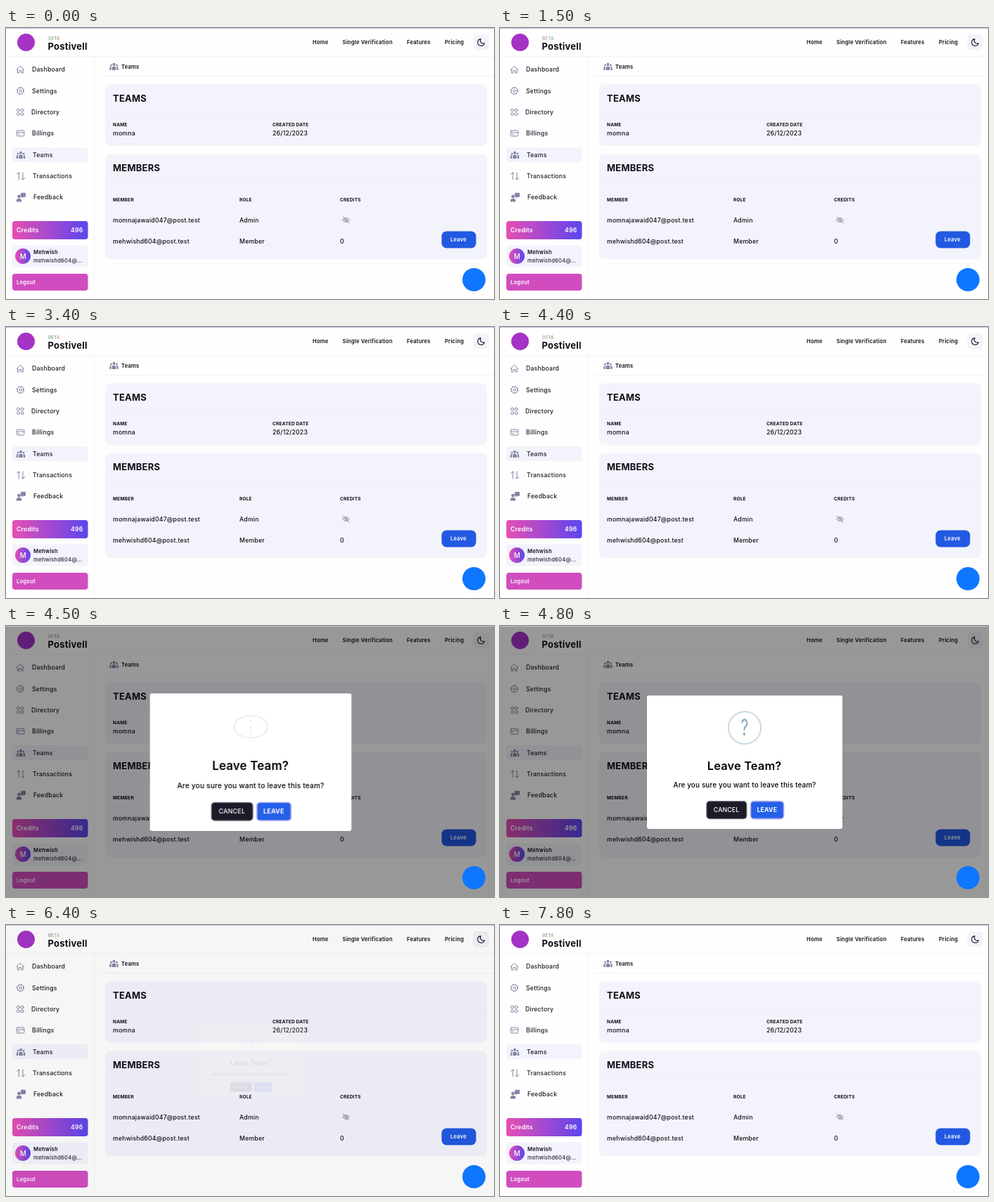
These frames come from a looping animation (694 by 386 pixels, 8000 ms). An HTML page:

```html
<!DOCTYPE html>
<html lang="en">
<head>
<meta charset="utf-8">
<title>Team settings</title>
<style>
html, body { margin: 0; width: 100%; height: 100%; overflow: hidden; background: #fefefe; }
body { position: relative; font-family: Inter, sans-serif; letter-spacing: .217px; }
svg { display: block; overflow: visible; }
#page, #dialog, #backdrop { position: absolute; left: 0; top: 0; width: 694px; height: 386px; }
#backdrop { top: 1px; height: 385px; background: rgba(0, 0, 0, .4); }
#dialog { opacity: 0; }
#popup { position: absolute; left: 208.5px; top: 99px; width: 278px; height: 190px; border-radius: 2.7px; background: #fff; }
#icon { position: absolute; left: 115px; top: 22px; width: 43.6px; height: 43.6px; border: 2.2px solid #c9dae1; border-radius: 50%; }
#mark { color: #80a5b7; font-size: 32.6px; line-height: 43.6px; text-align: center; letter-spacing: 0; }
#chat { position: absolute; left: 649.3px; top: 341.5px; width: 33px; height: 33px; border-radius: 50%; background: #0f76ff; }
.line { fill: none; stroke: #8585a6; stroke-width: 1; stroke-linecap: round; stroke-linejoin: round; }
.solid { fill: #8585a6; }
.panel { fill: #f3f3fb; }
.rule { stroke: #f3f3f6; stroke-width: 1; }
.panel-rule { stroke: #ececf4; stroke-width: 1; }
</style>
</head>
<body>
<svg id="page" viewBox="0 0 694 386">
  <defs>
    <linearGradient id="brand"><stop stop-color="#e64fb3"/><stop offset="1" stop-color="#5d45ee"/></linearGradient>
    <linearGradient id="shimmer" gradientUnits="userSpaceOnUse" x1="60" x2="84" spreadMethod="repeat">
      <stop stop-color="#b4c2b4"/><stop offset=".35" stop-color="#68a870"/>
      <stop offset=".7" stop-color="#d0949a"/><stop offset="1" stop-color="#b4c2b4"/>
    </linearGradient>
    <g id="people" class="solid">
      <circle cx="0" cy="-3.2" r="2"/><circle cx="-4" cy="-1.9" r="1.4"/><circle cx="4" cy="-1.9" r="1.4"/>
      <path d="M-2.8 5V2.2a2.8 2.8 0 0 1 5.6 0V5zM-6.2 5V2.2a2.1 2.1 0 0 1 2.6-2Q-4 1-4 5zM6.2 5V2.2a2.1 2.1 0 0 0-2.6-2Q4 1 4 5z"/>
    </g>
  </defs>
  <rect width="694" height="386" fill="#fefefe"/>
  <rect width="694" height="1" fill="#b4c0d8"/>
  <path class="rule" d="M0 40.5H694M125.5 41V386M134 68.5H694"/>
  <g class="panel">
    <rect x="141" y="80" width="543" height="88" rx="8"/>
    <rect x="141" y="179.5" width="543" height="150" rx="8"/>
    <rect x="9" y="170" width="107.5" height="21" rx="4"/>
    <rect x="9" y="309.5" width="107.5" height="31" rx="4"/>
    <rect x="664.5" y="9" width="22.5" height="22.5" rx="5"/>
  </g>
  <path class="panel-rule" d="M141 121.5H684M141 220.5H684"/>
  <circle cx="28.5" cy="20.5" r="12.5" fill="#a433c6"/>
  <path d="M675.2 15.6a4.9 4.9 0 1 0 5.2 6.2a4.2 4.2 0 0 1-5.2-6.2z" fill="none" stroke="#171721" stroke-width="1.1" stroke-linejoin="round"/>
  <rect x="9" y="275" width="107.5" height="26" rx="4" fill="url(#brand)"/>
  <rect x="9" y="350" width="107.5" height="24" rx="4" fill="#d14dbf"/>
  <circle cx="24" cy="325" r="11" fill="url(#brand)"/>
  <rect x="619.5" y="289.5" width="49" height="24" rx="7" fill="#2259e2"/>

  <g class="line">
    <path d="M15 59.5L20.3 54.2L25.6 59.5M16.4 58.5V64H18.8V60.5H21.8V64H24.2V58.5"/>
    <circle cx="20.5" cy="89.5" r="4.5"/><circle cx="20.5" cy="89.5" r="1.7"/>
    <circle cx="20.5" cy="89.5" r="5" stroke-width="1.2" stroke-dasharray="1.6 2.33" stroke-linecap="butt"/>
    <circle cx="17.5" cy="117" r="2"/><circle cx="23" cy="117" r="2"/>
    <circle cx="17.5" cy="122.7" r="2"/><circle cx="23" cy="122.7" r="2"/>
    <rect x="15.3" y="146" width="10.5" height="8" rx="1.2"/><path d="M15.3 149H25.8M17.3 151.8H19"/>
    <path d="M18.2 216V205.8L15.6 208.4M18.2 205.8L20 207.6M24 205.8V216L26.6 213.4M24 216L22.2 214.2"/>
    <path d="M478.6 273.5Q483.5 267.3 488.4 273.5Q483.5 279.7 478.6 273.5zM479.3 269L487.9 278"/>
    <circle cx="483.5" cy="273.5" r="1.6"/>
  </g>
  <use href="#people" x="21" y="181"/>
  <use href="#people" x="153.5" y="55"/>
  <g class="solid">
    <circle cx="18.5" cy="240" r="2.4"/><path d="M14.8 247.5V246a3 3 0 0 1 3-3h1.4a3 3 0 0 1 3 3v1.5z"/>
    <path d="M22 234.8h5a1 1 0 0 1 1 1v4a1 1 0 0 1-1 1h-2.6l-1.8 1.6v-1.6H22a1 1 0 0 1-1-1v-4a1 1 0 0 1 1-1z"/>
  </g>
  <g id="labels"></g>
</svg>

<div id="dialog">
  <div id="backdrop"></div>
  <div id="popup">
    <svg width="278" height="190" viewBox="208.5 99 278 190">
      <rect x="293.3" y="249.6" width="57" height="25" rx="4.5" fill="#1b1b29" stroke="#73737e" stroke-width="1.2"/>
      <rect id="confirm" x="356" y="249.6" width="47" height="25" rx="4.5" fill="#2560e8" stroke="#b0aaee" stroke-width="1.6"/>
      <g id="dialogLabels" text-anchor="middle"></g>
    </svg>
    <div id="icon"><div id="mark">?</div></div>
  </div>
</div>
<div id="chat"></div>

<script>
const LOOP = 8000, OPEN = 4350, CLOSE = 6302;
const INK = '#0f0f18';
const $ = id => document.getElementById(id);

function write(parent, size, weight, fill, items) {
  for (const [x, y, text] of items) {
    const node = document.createElementNS(parent.namespaceURI, 'text');
    const attrs = { x, y, fill, 'font-size': size, 'font-weight': weight };
    for (const name in attrs) node.setAttribute(name, attrs[name]);
    node.textContent = text;
    parent.append(node);
  }
}

const labels = $('labels');
write(labels, 6.2, 600, 'url(#shimmer)', [[60, 16.6, 'BETA']]);
write(labels, 13, 700, INK, [[59.5, 31, 'Postivell'], [152, 105.2, 'TEAMS'], [152, 204.2, 'MEMBERS']]);
write(labels, 7.6, 600, INK, [
  [436, 23, 'Home'], [478.5, 23, 'Single Verification'], [570, 23, 'Features'], [624, 23, 'Pricing'],
  [164, 57.5, 'Teams'], [39, 322.3, 'Mehwish']
]);
write(labels, 8.69, 500, '#1c1c28', [
  [37, 62.2, 'Dashboard'], [37, 92.6, 'Settings'], [36, 122.9, 'Directory'], [37, 153.2, 'Billings'],
  [38, 183.6, 'Teams'], [38, 213.9, 'Transactions'], [39, 244.2, 'Feedback']
]);
write(labels, 6.5, 700, INK, [
  [152, 140, 'NAME'], [379, 140, 'CREATED DATE'],
  [152, 247.2, 'MEMBER'], [332, 247.2, 'ROLE'], [475, 247.2, 'CREDITS']
]);
write(labels, 8.69, 500, INK, [
  [152, 153.2, 'momna'], [379, 153.2, '26/12/2023'],
  [152, 276.7, 'momnajawaid047@post.test'], [332, 276.7, 'Admin'],
  [152, 307, 'mehwishd604@post.test'], [332, 307, 'Member'], [475, 307, '0']
]);
write(labels, 7.6, 500, '#2a2a36', [[39, 333.6, 'mehwishd604@...']]);
write(labels, 8.69, 600, '#fff', [[15, 291.2, 'Credits'], [92, 291.2, '496']]);
write(labels, 7.6, 600, '#fff', [[15, 364.9, 'Logout'], [632, 304.2, 'Leave']]);
write(labels, 9.8, 500, '#fff', [[19.8, 328.6, 'M']]);

const dialogLabels = $('dialogLabels');
write(dialogLabels, 16.3, 600, '#000', [[347.1, 205, 'Leave Team?']]);
write(dialogLabels, 9.77, 500, '#000', [[347.5, 230.2, 'Are you sure you want to leave this team?']]);
write(dialogLabels, 8.69, 500, '#fff', [[321.6, 265.2, 'CANCEL']]);
write(dialogLabels, 8.69, 700, '#fff', [[379.3, 265.2, 'LEAVE']]);

// Steps are [time in ms, properties, easing towards the next step].
function play(el, steps) {
  const frames = steps.map(([ms, props, easing = 'linear']) => ({ offset: ms / LOOP, easing, ...props }));
  el.animate(frames, { duration: LOOP, iterations: Infinity });
}
const scale = (size, opacity = 1) => ({ transform: `scale(${size})`, opacity });
const tilt = (deg, opacity) => ({ transform: `rotateX(${deg}deg)`, opacity });
const spin = deg => ({ transform: `rotateY(${deg}deg)` });

play($('dialog'), [
  [0, { opacity: 0 }, 'step-end'], [4402, { opacity: 1 }, 'step-end'],
  [CLOSE + 150, { opacity: 0 }], [LOOP, { opacity: 0 }]
]);
play($('backdrop'), [
  [0, { opacity: 1 }], [CLOSE, { opacity: 1 }, 'ease'], [CLOSE + 150, { opacity: 0 }], [LOOP, { opacity: 0 }]
]);
play($('popup'), [
  [0, scale(.7)], [OPEN, scale(.7), 'ease'], [OPEN + 135, scale(1.05), 'ease'],
  [OPEN + 240, scale(.95), 'ease'], [OPEN + 300, scale(1)],
  [CLOSE, scale(1), 'ease'], [CLOSE + 150, scale(.5, 0)], [LOOP, scale(.5, 0)]
]);
play($('icon'), [
  [0, tilt(100, 0)], [OPEN, tilt(100, 0), 'ease'], [OPEN + 500, tilt(0, 1)], [LOOP, tilt(0, 1)]
]);
play($('mark'), [[0, spin(-360)], [OPEN, spin(-360), 'ease'], [OPEN + 800, spin(0)], [LOOP, spin(0)]]);
play($('confirm'), [
  [0, { fill: '#2560e8' }, 'step-end'], [5500, { fill: '#2153d0' }, 'step-end'],
  [7000, { fill: '#2560e8' }], [LOOP, { fill: '#2560e8' }]
]);

const shimmer = $('shimmer');
function tick() {
  const phase = performance.now() % LOOP / LOOP;
  shimmer.setAttribute('gradientTransform', `translate(${phase * 48} 0)`);
  requestAnimationFrame(tick);
}
tick();
</script>
</body>
</html>
```
